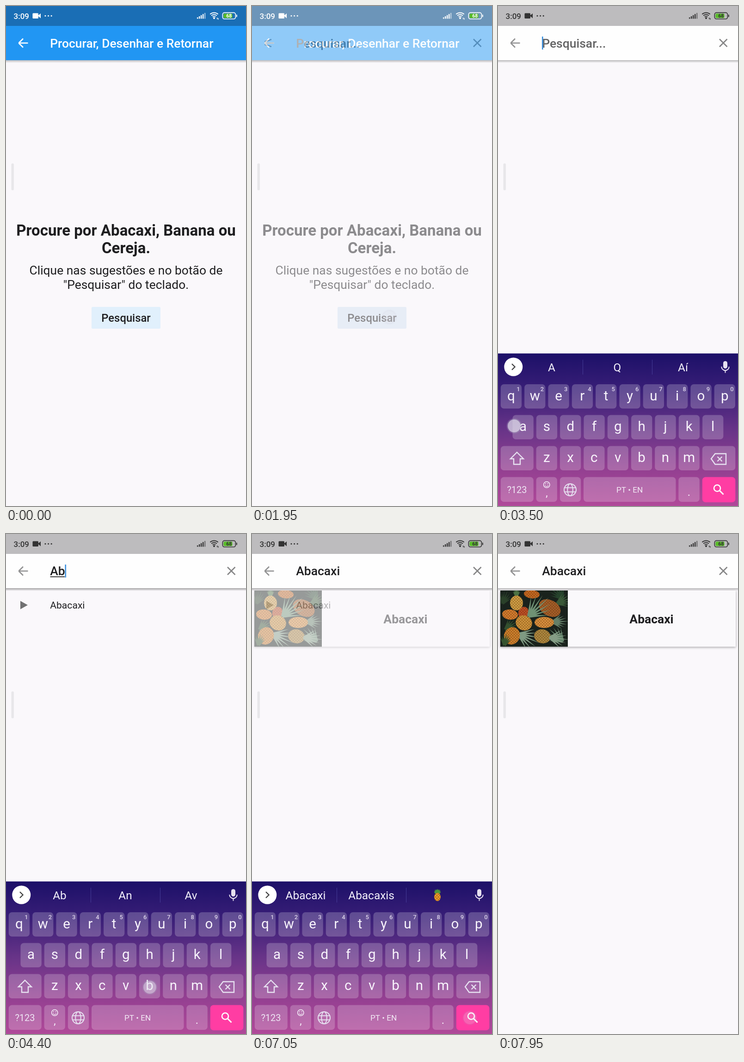
Animation of 519 by 1080 pixels, one loop 8 s. Source, as an HTML page with a canvas:

```html
<!DOCTYPE html>
<html lang="pt">
<head>
<meta charset="utf-8">
<style>
html, body { margin: 0; width: 100%; height: 100%; overflow: hidden; background: #faf8fb; }
canvas { display: block; width: 100vw; height: 100vh; }
</style>
</head>
<body>
<canvas id="stage"></canvas>
<script>
const W = 519, H = 1080, LOOP = 8000, KB_TOP = 750.5, KB_H = H - KB_TOP;
const TAU = Math.PI * 2, FONT = 'Roboto, "Noto Sans", sans-serif';
const BG = '#faf8fb', INK = '#1e1e20';
const ratio = window.devicePixelRatio || 1;

function makeContext(canvas) {
  canvas.width = W * ratio;
  canvas.height = H * ratio;
  const c = canvas.getContext('2d');
  c.scale(ratio, ratio);
  return c;
}
const screen2d = makeContext(document.getElementById('stage'));
const layer2d = makeContext(document.createElement('canvas'));
let g = screen2d;

const clamp = v => Math.max(0, Math.min(1, v));
const span = (t, from, to) => clamp((t - from) / (to - from));
const mix = (a, b, p) => a + (b - a) * p;

// ---------- drawing helpers ----------
function rect(x, y, w, h, color, r = 0) {
  g.fillStyle = color;
  g.beginPath();
  g.roundRect(x, y, w, h, r);
  g.fill();
}
function disc(x, y, r, color) {
  g.fillStyle = color;
  g.beginPath();
  g.arc(x, y, r, 0, TAU);
  g.fill();
}
function ring(x, y, r, color, width, from = 0, to = TAU) {
  g.strokeStyle = color;
  g.lineWidth = width;
  g.beginPath();
  g.arc(x, y, r, from, to);
  g.stroke();
}
function oval(x, y, rx, ry, turn, color) {
  g.fillStyle = color;
  g.beginPath();
  g.ellipse(x, y, rx, ry, turn, 0, TAU);
  g.fill();
}
function trace(points, close) {
  g.beginPath();
  for (let i = 0; i < points.length; i += 2) g.lineTo(points[i], points[i + 1]);
  if (close) g.closePath();
}
function line(points, color, width, close) {
  trace(points, close);
  g.strokeStyle = color;
  g.lineWidth = width;
  g.stroke();
}
function shape(points, color) {
  trace(points, true);
  g.fillStyle = color;
  g.fill();
}
// y is the middle of the capital letters
function text(str, x, y, size, weight, color, align = 'left') {
  g.font = `${weight} ${size}px ${FONT}`;
  g.textAlign = align;
  g.fillStyle = color;
  g.fillText(str, x, y + size * 0.355);
}
function faded(alpha, draw) {
  if (alpha <= 0) return;
  if (alpha >= 1) return draw();
  const target = g;
  g = layer2d;
  g.clearRect(0, 0, W, H);
  draw();
  g = target;
  g.globalAlpha = alpha;
  g.drawImage(layer2d.canvas, 0, 0, W, H);
  g.globalAlpha = 1;
}
function shadowBelow(x, y, w, h, alpha) {
  const fade = g.createLinearGradient(0, y, 0, y + h);
  fade.addColorStop(0, `rgba(0,0,0,${alpha})`);
  fade.addColorStop(1, 'rgba(0,0,0,0)');
  rect(x, y, w, h, fade);
}

// ---------- status bar ----------
function statusIcons(c) {
  text('3:09', 16.5, 21.5, 17, 500, c);
  rect(57.5, 15.5, 12.5, 11.5, c, 1.5);
  shape([69, 21, 75, 16, 75, 26.5], c);
  for (let i = 0; i < 3; i++) disc(85 + i * 6.6, 21.3, 1.5, c);
  for (let i = 0; i < 5; i++) {
    const h = 3 + i * 2.4;
    g.globalAlpha = i === 4 ? 0.55 : 1;
    rect(413 + i * 4, 27.5 - h, 2.4, h, c);
  }
  g.globalAlpha = 1;
  for (const r of [4.6, 8.6, 12.6]) ring(450, 27, r, c, 2, -TAU * 0.37, -TAU * 0.13);
  disc(450, 26.2, 2, c);
  rect(456, 25, 1.3, 3.5, c);
  rect(458.3, 26, 1.3, 3.5, c);
  rect(470.5, 16.5, 19, 9.5, '#58bb28', 2);
  g.strokeStyle = c;
  g.lineWidth = 1.7;
  g.beginPath();
  g.roundRect(468.4, 14.4, 28, 13.6, 4);
  g.stroke();
  rect(498, 18.5, 1.8, 5.5, c, 1);
  text('68', 482.3, 21.4, 10.5, 700, c, 'center');
}

// ---------- pages ----------
function arrowIcon(color, p) {
  const menu = [[27, 74, 47, 74], [27, 80, 47, 80], [27, 86, 47, 86]];
  const arrow = [[27.5, 80, 37, 70.5], [28, 80, 47.5, 80], [27.5, 80, 37, 89.5]];
  menu.forEach((m, i) => line(m.map((v, k) => mix(v, arrow[i][k], p)), color, 2.6));
}
function homePage(t) {
  rect(0, 0, W, H, BG);
  rect(0, 0, W, 43, '#1a6eb5');
  rect(0, 43, W, 74, '#2196f3');
  shadowBelow(0, 117, W, 6, 0.24);
  arrowIcon('#fff', 1);
  text('Procurar, Desenhar e Retornar', 95.2, 80.5, 26.43, 500, '#fff');
  text('Procure por Abacaxi, Banana ou', 259.5, 484, 33.04, 700, INK, 'center');
  text('Cereja.', 259.5, 522.5, 33.04, 700, INK, 'center');
  text('Clique nas sugestões e no botão de', 259.5, 571, 26.43, 400, INK, 'center');
  text('"Pesquisar" do teclado.', 259.5, 601.5, 26.43, 400, INK, 'center');
  rect(185, 650, 149, 47, '#e1f0fc', 2.5);
  const press = span(t, 1300, 1800);
  if (press) {
    g.save();
    g.beginPath();
    g.roundRect(185, 650, 149, 47, 2.5);
    g.clip();
    disc(297, 672, 12 + 110 * press, 'rgba(60,60,120,0.07)');
    g.restore();
  }
  text('Pesquisar', 259.5, 674, 23.79, 500, INK, 'center');
}

const queryAt = t => t < 3540 ? '' : t < 4350 ? 'A' : t < 5050 ? 'Ab' : t < 5600 ? 'Aba' : 'Abacaxi';

function searchBar(t) {
  rect(0, 0, W, 43, '#bdbcbe');
  rect(0, 43, W, 74, '#fefefe');
  shadowBelow(0, 117, W, 6, 0.26);
  arrowIcon('#939394', span(t, 1800, 2100));
  line([479, 71.5, 495.5, 88], '#858586', 2.5);
  line([495.5, 71.5, 479, 88], '#858586', 2.5);
  const query = queryAt(t), focused = t < 6930;
  if (query) text(query, 95.2, 79.5, 26.43, 500, INK);
  else text('Pesquisar...', 95.2, 80.2, 26.43, 500, '#636364');
  if (!focused) return;
  const end = query ? g.measureText(query).width : 0;
  if (query) rect(95.5, 91.5, end - 1, 1.8, INK);
  const last = [2050, 3540, 4350, 5050, 5600].filter(s => s <= t).pop();
  if (last && Math.floor((t - last) / 500) % 2 === 0) rect(95 + end, 66, 2.6, 28, '#3c8fdc');
}
function suggestionRow(t) {
  g.save();
  g.beginPath();
  g.rect(0, 117, W, 74);
  g.clip();
  const out = 1 - span(t, 5580, 5800);
  const tint = span(t, 5280, 5480) * out;
  if (tint) {
    rect(0, 117, W, 74, `rgba(0,0,0,${0.105 * tint})`);
    const grow = span(t, 5300, 5500) * 87 + span(t, 5560, 5760) * 320;
    disc(131, 150, grow, `rgba(0,0,0,${0.08 * out})`);
  }
  g.restore();
  shadowBelow(0, 117, W, 6, 0.12);
  shape([31, 144.5, 47, 153.5, 31, 162.5], '#717172');
  text('Abacaxi', 95.2, 153.3, 21.14, 400, INK);
}

// ---------- fruit photo ----------
function leaves(x, y, turn, size, color) {
  for (let i = -3; i <= 3; i++) {
    const a = turn + i * 0.23, len = size * (1 - Math.abs(i) * 0.09);
    const dx = Math.cos(a), dy = Math.sin(a);
    shape([x - dy * 3, y + dx * 3, x + dx * len, y + dy * len, x + dy * 3, y - dx * 3], color);
  }
}
function fruit(x, y, rx, ry, turn, color) {
  oval(x, y, rx, ry, turn, color);
  g.save();
  g.beginPath();
  g.ellipse(x, y, rx, ry, turn, 0, TAU);
  g.clip();
  for (let k = -40; k <= 40; k += 6) {
    line([x + k - 22, y - 22, x + k + 22, y + 22], 'rgba(80,40,10,0.38)', 1.1);
    line([x + k + 22, y - 22, x + k - 22, y + 22], 'rgba(80,40,10,0.38)', 1.1);
  }
  g.restore();
}
function photo() {
  g.save();
  g.beginPath();
  g.rect(5, 122, 146, 121.5);
  g.clip();
  rect(5, 122, 146, 122, '#19221c');
  leaves(10, 150, -1.2, 30, '#2a4029');
  leaves(16, 206, -0.6, 32, '#33502f');
  leaves(140, 140, -2.2, 38, '#26432c');
  leaves(128, 150, -0.4, 34, '#3a5938');
  fruit(73, 130, 17, 9, 0.1, '#c96a22');
  fruit(112, 160, 25, 17, 0.5, '#a8602a');
  fruit(55, 170, 11, 13, 0.3, '#c24e26');
  leaves(66, 178, -0.75, 60, '#6f9174');
  leaves(40, 134, -1.57, 17, '#4d7244');
  fruit(40, 149, 14, 16, 0, '#d4a347');
  fruit(26, 174, 17, 11, 0.1, '#d97f30');
  fruit(56, 192, 18, 16, 0.4, '#d3973d');
  leaves(118, 190, -0.05, 34, '#647f68');
  fruit(100, 191, 21, 12, 0, '#df9440');
  leaves(140, 232, -2.4, 40, '#62836a');
  leaves(44, 216, 0.4, 50, '#7f9a82');
  fruit(30, 220, 17, 19, 0.4, '#d2832e');
  fruit(96, 221, 18, 15, 0.2, '#b08c42');
  leaves(112, 224, 0.1, 40, '#859e86');
  leaves(14, 240, -1.4, 26, '#35532f');
  g.restore();
}
function resultCard() {
  g.save();
  g.shadowColor = 'rgba(0,0,0,0.35)';
  g.shadowBlur = 5 * ratio;
  g.shadowOffsetY = 1.5 * ratio;
  rect(5, 122, 509, 121.5, '#faf9fb', 1);
  g.restore();
  photo();
  text('Abacaxi', 332, 183.5, 26.43, 700, INK, 'center');
}
function searchPage(t) {
  rect(0, 0, W, H, BG);
  searchBar(t);
}

// ---------- keyboard ----------
const KEY = 'rgba(255,255,255,0.21)', GLYPH = '#f8f4fc', SOFT = '#e6e0f0', PITCH = 51.32;

function letterRow(letters, x, y) {
  [...letters].forEach((ch, i) => {
    rect(x + i * PITCH, y, 45.3, 52.5, KEY, 7);
    text(ch, x + i * PITCH + 22.6, y + 24.2, 29.5, 400, GLYPH, 'center');
  });
}
function mic() {
  rect(487, 767, 9, 16, SOFT, 4.5);
  ring(491.5, 779, 8.2, SOFT, 2, 0, Math.PI);
  rect(490.5, 787, 2, 5.5, SOFT);
}
function gear(x, y) {
  for (let i = 0; i < 6; i++) {
    g.save();
    g.translate(x, y);
    g.rotate(i * TAU / 6 + TAU / 12);
    rect(6, -3.6, 5.5, 7.2, SOFT, 1);
    g.restore();
  }
  ring(x, y, 6.6, SOFT, 5);
}
function pineapple(x, y) {
  for (const a of [-2.1, -1.57, -1.05]) leaves(x, y - 3, a, 11, '#4f9a3c');
  fruit(x, y + 4, 7, 9, 0, '#f2a02e');
}
function toolbar() {
  line([36.5, 773, 30.5, 779, 36.5, 785], '#444', 2.4);
  g.lineJoin = 'round';
  line([92, 769.5, 111, 769.5, 111, 782, 104, 789, 92, 789], SOFT, 2.4, true);
  g.lineJoin = 'miter';
  line([104, 789, 104, 782, 111, 782], SOFT, 2);
  disc(97.5, 775.5, 1.5, SOFT);
  line([103, 776, 107, 774.5], SOFT, 2);
  ring(101, 777.5, 5, SOFT, 1.8, 0.5, 2.6);
  text('GIF', 175, 779, 20.5, 900, SOFT, 'center');
  gear(251, 779.5);
  rect(315, 769, 22, 22, SOFT, 2);
  rect(371, 765, 1, 28, 'rgba(255,255,255,0.2)');
  for (const x of [409.5, 417.5, 425.5]) disc(x, 779.5, 2.7, SOFT);
}
function suggestions(t) {
  line([30, 773, 36.5, 779.5, 30, 786], '#444', 2.4);
  for (const x of [183, 333]) rect(x, 764, 1, 32, 'rgba(120,130,220,0.35)');
  const words = t < 4370 ? ['A', 'Q', 'Aí'] : t < 5070 ? ['Ab', 'An', 'Av']
    : t < 5700 ? ['Aba', 'Ana', 'Ava'] : ['Abacaxi', 'Abacaxis'];
  words.forEach((w, i) => text(w, 116 + i * 142, 780.5, 24.4, 400, '#f3f1fb', 'center'));
  if (words.length < 3) pineapple(401, 780);
}
function keyboard(t) {
  const hide = span(t, 7070, 7190);
  const drop = KB_H * ((1 - span(t, 2130, 2417)) ** 2 + hide * hide);
  if (drop >= KB_H) return;
  g.save();
  g.translate(0, drop);
  const sky = g.createLinearGradient(0, KB_TOP, 0, H);
  ['#1c1068', '#3a1f78', '#683488', '#923f91', '#b04999'].forEach((c, i) => sky.addColorStop(i / 4, c));
  rect(0, KB_TOP, W, KB_H, sky);
  disc(33.3, 779.5, 20, '#fff');
  if (t < 3480) toolbar(); else suggestions(t);
  mic();

  letterRow('qwertyuiop', 5.8, 817);
  [...'1234567890'].forEach((d, i) => text(d, 44 + i * PITCH, 827.3, 13, 500, '#dcd3ea', 'center'));
  letterRow('asdfghjkl', 31.5, 883.5);
  letterRow('zxcvbnm', 82.6, 950.5);
  rect(5.8, 950.5, 71, 52.5, KEY, 7);
  rect(441.8, 950.5, 71.5, 52.5, KEY, 7);
  line([41, 964, 55, 978, 48, 978, 48, 990, 34, 990, 34, 978, 27, 978], SOFT, 2.4, true);
  line([461, 978, 469.5, 967, 493, 967, 493, 990, 469.5, 990], SOFT, 2.4, true);
  line([474.5, 973.5, 484.5, 983.5], SOFT, 2.4);
  line([484.5, 973.5, 474.5, 983.5], SOFT, 2.4);

  for (const [x, w] of [[5.8, 71], [82.6, 45.3], [133.9, 45.3], [185, 199.5], [390.3, 45.5]])
    rect(x, 1017.5, w, 53.5, KEY, 7);
  rect(441.8, 1017.5, 71.5, 54.5, '#ff3da3', 7);
  text('?123', 41, 1045.2, 20, 400, '#eee5f3', 'center');
  ring(105.3, 1034, 6.6, GLYPH, 1.5);
  disc(103, 1032, 1.1, GLYPH);
  disc(107.6, 1032, 1.1, GLYPH);
  ring(105.3, 1034.5, 3.4, GLYPH, 1.3, 0.3, 2.85);
  text(',', 105.3, 1051, 22, 400, GLYPH, 'center');
  ring(156, 1045, 13, SOFT, 2);
  g.beginPath();
  g.ellipse(156, 1045, 5.8, 13, 0, 0, TAU);
  g.stroke();
  line([144, 1040.5, 168, 1040.5], SOFT, 2);
  line([144, 1049.5, 168, 1049.5], SOFT, 2);
  text('PT • EN', 284.5, 1045, 17.1, 400, '#f3eaf6', 'center');
  text('.', 413, 1049, 24, 400, GLYPH, 'center');
  ring(474, 1041.5, 7, '#fff', 2.6);
  line([479, 1046.5, 487.5, 1055], '#fff', 3);
  g.restore();
}

// ---------- touch marks: x, y, down, up ----------
const touches = [
  [297, 672, 1200, 1820], [35, 907, 3390, 3560], [311, 979, 4220, 4350],
  [37, 908, 4920, 5050], [132, 150, 5290, 5560], [471, 1045, 6780, 6930]
];
function touchMarks(t) {
  for (const [x, y, down, up] of touches) {
    const a = span(t, down - 50, down) * (1 - span(t, up, up + 170));
    if (!a) continue;
    g.globalAlpha = a;
    disc(x, y, 16.5, 'rgba(175,170,195,0.28)');
    disc(x, y, 14, 'rgba(238,238,246,0.6)');
    ring(x, y, 14, 'rgba(150,150,180,0.35)', 1);
    g.globalAlpha = 1;
  }
}

function render(t) {
  g = screen2d;
  const open = span(t, 1800, 2100), results = span(t, 6920, 7220);
  if (open < 1) homePage(t);
  faded(open, () => searchPage(t));
  if (t >= 3540) faded(1 - results, () => suggestionRow(t));
  faded(results, resultCard);
  statusIcons(t < 2050 ? '#fff' : '#333');
  keyboard(t);
  rect(11.5, 340, 5.5, 58, 'rgba(225,225,228,0.75)', 2.5);
  touchMarks(t);
}
const start = performance.now();
function tick() {
  render((performance.now() - start) % LOOP);
  requestAnimationFrame(tick);
}
tick();
</script>
</body>
</html>
```
